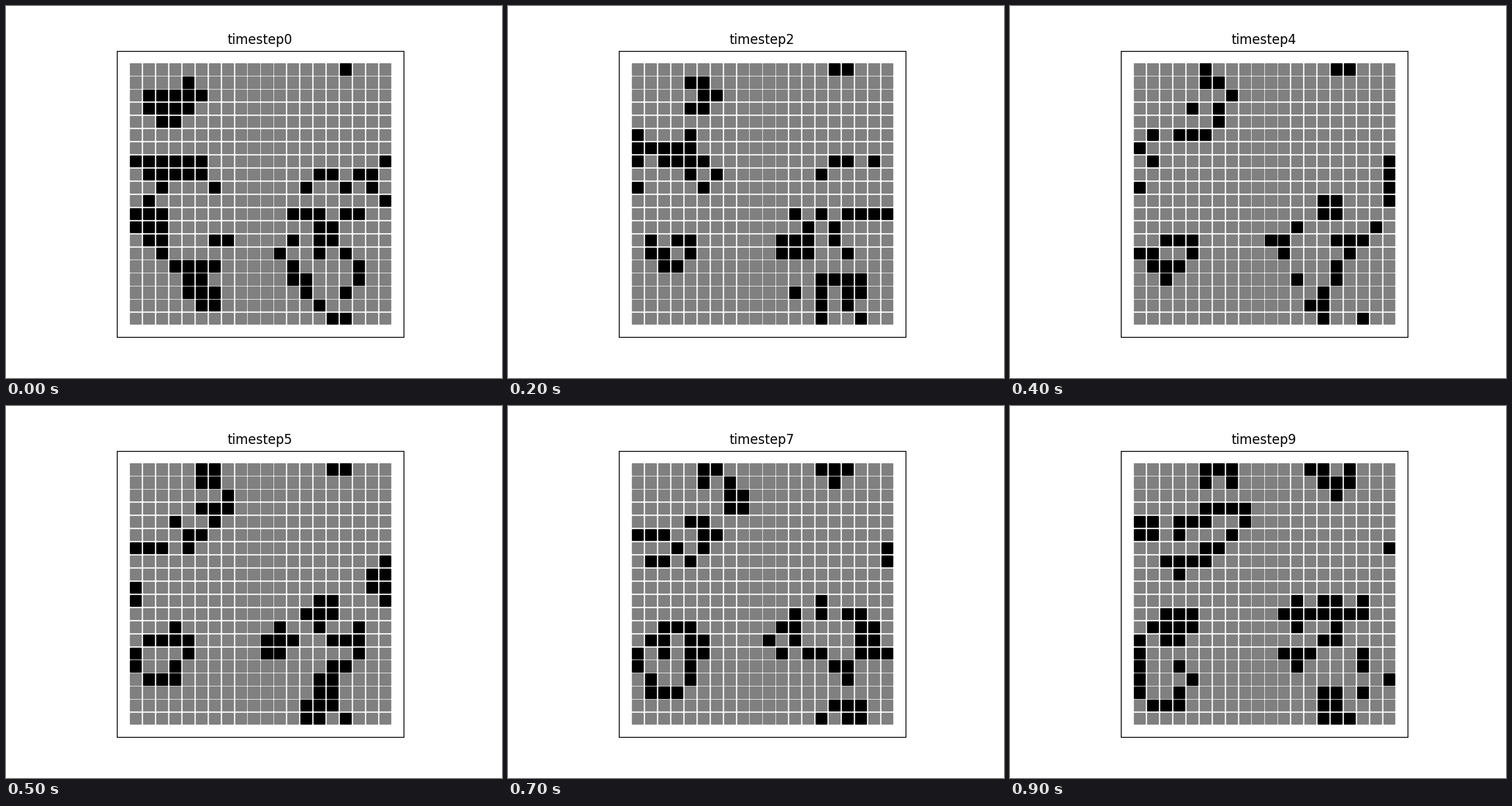
Recreate the animation shown at these times as a matplotlib script. Size 640 px wide and 480 px high, loop 1 s.

```python
import itertools
import math

import matplotlib.pyplot as plt
import numpy as np
from matplotlib.animation import FuncAnimation
from matplotlib.patches import Rectangle
from numpy import r_

SIZE = 20               # cells per side
STEPS = 10              # generations in one loop
SIDE = math.sqrt(0.7)   # drawn cells cover 0.7 of their grid square


def first_generation():
    """Lay the starting colonies as horizontal runs, from the top row down."""
    runs = (
        r_[16], r_[4], r_[1:6], r_[1:5], r_[2:4], [], [],
        r_[-1:6], r_[1:6, 14:16, 17:19], r_[2, 6, 13, 16, 18], r_[1, 19],
        r_[:3, 12:15, 16:18], r_[:3, 14:16], r_[1:3, 6:8, 12, 14:16],
        r_[2, 11, 14, 16], r_[3:7, 12, 17], r_[4:6, 12:14, 17],
        r_[4:7, 13, 16], r_[5:7, 14], r_[15:17],
    )
    grid = np.zeros((SIZE, SIZE), dtype=int)
    for row, columns in zip(grid, runs):
        row[columns] = 1
    return grid


def next_generation(grid, _=None):
    """Conway's rule on a board whose edges wrap around."""
    shifts = itertools.product((-1, 0, 1), repeat=2)
    total = sum(np.roll(grid, shift, axis=(0, 1)) for shift in shifts)
    return ((total == 3) | ((total == 4) & (grid == 1))).astype(int)


generations = list(
    itertools.accumulate(range(1, STEPS), next_generation, initial=first_generation())
)

fig, ax = plt.subplots(figsize=(6.4, 4.8), dpi=100)
ax.set_aspect("equal", "box")
ax.set_xticks([])
ax.set_yticks([])

span = SIZE - 1 + SIDE
margin = 0.05 * span
low = -SIDE / 2 - margin
high = low + span + 2 * margin
ax.set_xlim(low, high)
ax.set_ylim(high, low)

cells = [
    ax.add_patch(Rectangle((x - SIDE / 2, y - SIDE / 2), SIDE, SIDE))
    for y, x in itertools.product(range(SIZE), repeat=2)
]
title = ax.set_title("")


def update(step):
    for cell, alive in zip(cells, generations[step].flat):
        cell.set_color("black" if alive else "gray")
    title.set_text(f"timestep{step}")
    return [*cells, title]


animation = FuncAnimation(fig, update, frames=STEPS, interval=100, repeat=True)
plt.show()
```
